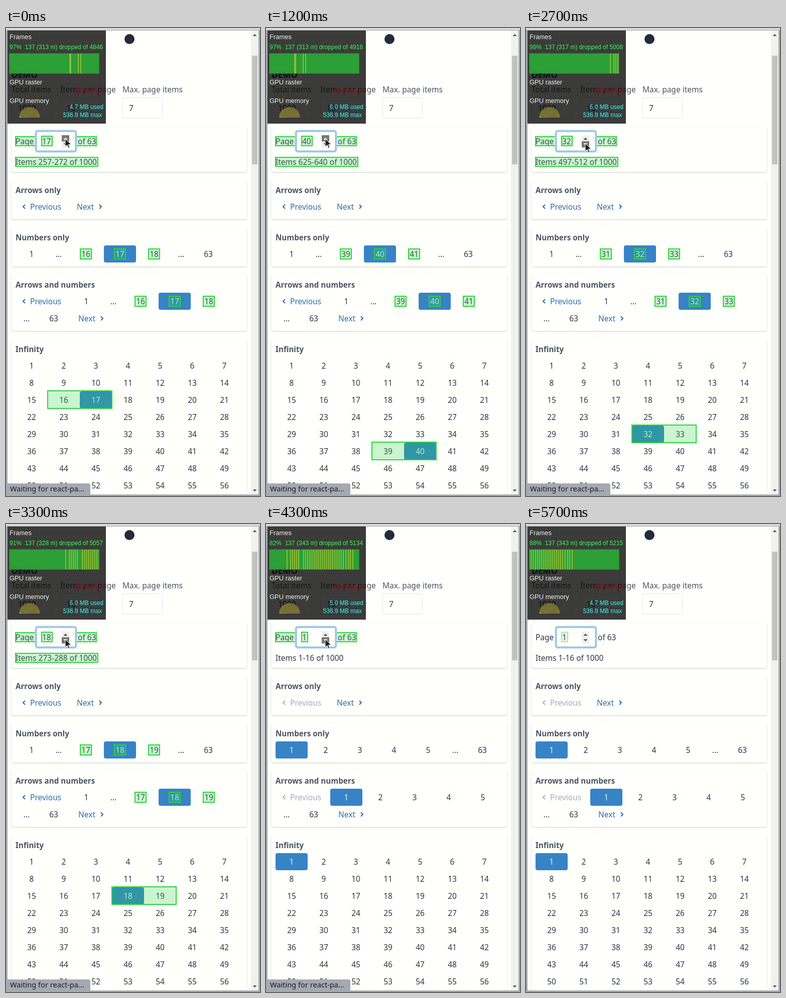
An HTML page with a canvas for the animation above (5800 ms loop, 506 by 930 pixels).

```html
<!DOCTYPE html>
<html lang="en">
<head>
<meta charset="utf-8">
<title>Pagination demo</title>
<style>
html, body { margin: 0; width: 100%; height: 100%; overflow: hidden; background: #fffffb; }
canvas { display: block; }
</style>
</head>
<body>
<canvas id="stage" width="506" height="930"></canvas>
<script>
const ctx = document.getElementById('stage').getContext('2d');
const LOOP = 5800, STEP = 100, LAST = 63;
const PAPER = '#fffffb', INK = '#2d3748', LABEL = '#4a5568', LINK = '#2f6cac';
const SANS = '"Noto Sans", sans-serif';
const BODY = '15.5px ' + SANS, BOLD = 'bold 15.2px ' + SANS;
const METER = '12px "Liberation Sans", sans-serif';

const pageKeys = [[0, 17], [1200, 40], [1400, 44], [1800, 44], [1900, 43],
  [2200, 43], [2700, 32], [3800, 8], [4120, 1]];
const frameKeys = [[0, 4846], [1200, 4916], [1900, 4961], [2700, 5008],
  [3800, 5098], [4300, 5134], [5700, 5215], [5800, 5221]];
const rateKeys = [[0, 97], [1900, 97], [2700, 98], [3800, 86], [4300, 82], [5700, 88]];
const memoryKeys = [[0, 4.7], [300, 6], [1700, 4.7], [2400, 6], [3500, 5.8], [4300, 5], [4600, 4.7]];

// Frame numbers at which a drop enters the chart's right edge
const oldDrops = [4973, 4975, 4990, 4995];
const newDrops = [5176, 5183, 5187, 5191, 5195, 5199,
  ...Array.from({ length: 19 }, (_, i) => 5209 + 4.15 * i),
  5288, 5293, 5298, 5302, 5307];

function lerpKeys(keys, t) {
  const i = keys.findIndex(k => k[0] > t);
  if (i < 0) return keys[keys.length - 1][1];
  const [t0, a] = keys[i - 1], [t1, b] = keys[i];
  return a + (b - a) * (t - t0) / (t1 - t0);
}

const holdKeys = (keys, t) => keys.filter(k => k[0] <= t).pop()[1];

function rect(x, y, w, h, color) {
  ctx.fillStyle = color;
  ctx.fillRect(x, y, w, h);
}

function rounded(x, y, w, h, r, fill, stroke, line = 1) {
  ctx.beginPath();
  ctx.roundRect(x, y, w, h, r);
  if (fill) { ctx.fillStyle = fill; ctx.fill(); }
  if (stroke) { ctx.strokeStyle = stroke; ctx.lineWidth = line; ctx.stroke(); }
}

function text(str, x, y, color = INK, font = BODY, align = 'left') {
  ctx.font = font;
  ctx.textAlign = align;
  ctx.fillStyle = color;
  ctx.fillText(str, x, y);
}

function poly(points, fill, stroke) {
  ctx.beginPath();
  points.forEach(([x, y]) => ctx.lineTo(x, y));
  ctx.closePath();
  ctx.fillStyle = fill;
  ctx.fill();
  if (stroke) { ctx.strokeStyle = stroke; ctx.lineWidth = 1; ctx.stroke(); }
}

function triangle(x, y, dir, color, s = 4) {
  poly([[x - s, y + dir * s / 2], [x + s, y + dir * s / 2], [x, y - dir * s / 2]], color);
}

function flash(x, y, w, h, alpha = 1) {
  ctx.globalAlpha = alpha;
  rect(x, y, w, h, 'rgba(30,210,60,.23)');
  ctx.strokeStyle = '#2bd63a';
  ctx.lineWidth = 2;
  ctx.strokeRect(x + 1, y + 1, w - 2, h - 2);
  ctx.globalAlpha = 1;
}

function card(y, h, title) {
  ctx.save();
  ctx.shadowColor = 'rgba(0,0,0,.2)';
  ctx.shadowBlur = 3;
  ctx.shadowOffsetY = 1;
  rounded(11, y, 469, h, 4, PAPER);
  ctx.restore();
  if (title) text(title, 19, y + 26, LABEL, BOLD);
}

function chevron(x, y, dir, color) {
  ctx.beginPath();
  ctx.moveTo(x - dir * 2, y - 4);
  ctx.lineTo(x + dir * 2, y);
  ctx.lineTo(x - dir * 2, y + 4);
  ctx.strokeStyle = color;
  ctx.lineWidth = 2;
  ctx.stroke();
}

function previous(y, page) {
  const color = page > 1 ? LINK : '#a0aec0';
  chevron(36, y, -1, color);
  text('Previous', 48, y + 5.5, color);
}

function next(x, y) {
  text('Next', x, y + 5.5, LINK);
  chevron(x + 47, y, 1, LINK);
}

function field(x, label, value) {
  text(label, x, 127.5, LABEL);
  rounded(x + .5, 138.5, 79, 41, 4, PAPER, '#e2e8f0');
  text(value, x + 13, 164.5);
}

function cell(n, x, y, selected) {
  if (selected) rounded(x - 32, y - 17, 64, 34, 4, '#3783c6');
  text(n, x, y + 5.5, selected ? '#e6f2f8' : INK, BODY, 'center');
}

function numbers(page, left, y, lit) {
  const early = page <= 4;
  const items = early ? [1, 2, 3, 4, 5, '...', LAST] : [1, '...', page - 1, page, page + 1, '...', LAST];
  const centers = early ? [51, 119, 187, 255, 323, 377, 431] : [51, 105, 159, 227, 295, 349, 403];
  items.forEach((n, i) => {
    const wraps = left && i > 4;
    const x = wraps ? (i === 5 ? 41 : 95) : centers[i] + left;
    const cy = wraps ? y + 34 : y;
    cell(n, x, cy, n === page);
    if (lit && Math.abs(n - page) < 2) {
      const w = n > 9 ? 24 : 15;
      flash(x - w / 2, cy - 11, w, 22);
    }
  });
}

function grid(page, lit, up) {
  const at = n => [51 + (n - 1) % 7 * 64, 671 + Math.floor((n - 1) / 7) * 34];
  for (let n = 1; n <= 56; n++) cell(n, ...at(n), n === page);
  if (!lit) return;
  const first = up ? page - 1 : page;
  const [x, y] = at(first);
  if (first % 7) {
    flash(x - 33, y - 19, 130, 37);
  } else {
    flash(x - 33, y - 19, 66, 37);
    flash(18, y + 15, 66, 37);
  }
}

function pageInput(t, page, showTop) {
  text('Page', 19, 230.5);
  text('of ' + LAST, 143, 230.5);
  const from = (page - 1) * 16 + 1;
  const items = `Items ${from}-${from + 15} of 1000`;
  text(items, 19, 271.5);
  if (showTop) {
    flash(18, 215, 42, 20);
    flash(137, 215, 44, 20);
  }
  if (t < 1700 || t >= 1900 && t < 4300) flash(18, 256, ctx.measureText(items).width + 4, 20);

  rounded(59.5, 204.5, 80, 41, 4, PAPER, '#a6cdec', 4);
  rounded(60.5, 205.5, 78, 39, 3, null, '#80b4dc');
  text(page, 72, 230.5);
  const blink = (t + 150) % 1000;
  if (blink < 450) rect(page > 9 ? 91 : 82, 216, 1, 18, INK);
  const age = blink < 450 ? blink : blink - 450;
  const w = page > 9 ? 23 : 14;
  flash(70, 214, w, 21, showTop || age < 300 ? 1 : .4);

  const hover = t < 1600 ? -1 : t < 5100 ? 1 : 0;
  rect(111, 213, 15, 25, '#efefec');
  if (hover) rect(111, hover < 0 ? 213 : 225, 15, 12.5, '#777774');
  triangle(118.5, 220, 1, hover < 0 ? '#fff' : '#484848');
  triangle(118.5, 231, -1, hover > 0 ? '#fff' : '#484848');
}

function cursor(x, y) {
  poly([[0, 0], [0, 16], [4, 12.5], [6.5, 18.5], [9, 17.5], [6.5, 11.5], [12, 11.5]]
    .map(([dx, dy]) => [x + dx, y + dy]), '#1c1c1c', '#fff');
}

function meter(t) {
  const count = Math.round(lerpKeys(frameKeys, t));
  const dropped = 313 + newDrops.filter(d => d <= count + 186).length;
  const rate = Math.round(lerpKeys(rateKeys, t));
  const head = '13px "Liberation Sans", sans-serif';
  rect(3, 5, 196, 185, 'rgba(0,0,0,.77)');
  text('Frames', 7, 22, '#f2f2f2', head);
  text(`${rate}%  137 (${dropped} m) dropped of ${count}`, 7, 42, '#35fb52', METER);

  rect(6, 50, 180, 41, 'rgba(43,174,54,.88)');
  ctx.save();
  ctx.beginPath();
  ctx.rect(6, 50, 180, 41);
  ctx.clip();
  for (const d of [...oldDrops, ...newDrops]) rect(d - count - 1, 50, 2, 41, '#8fbb35');
  ctx.restore();
  ctx.strokeStyle = '#23802b';
  ctx.lineWidth = 1;
  ctx.strokeRect(6.5, 50.5, 179, 40);

  text('GPU raster', 7, 112, '#f2f2f2', head);
  text('off (device)', 136, 128, '#b00518', METER);
  text('GPU memory', 7, 149, '#f2f2f2', head);
  ctx.beginPath();
  ctx.arc(47, 178, 21, Math.PI, 0);
  ctx.fillStyle = 'rgba(128,122,49,.85)';
  ctx.fill();
  poly([[26, 178], [26, 176.5], [47, 178]], '#2fc53d');
  text(holdKeys(memoryKeys, t).toFixed(1) + ' MB used', 194, 161, '#40f5f5', METER, 'right');
  text('536.9 MB max', 191, 177, '#40f5f5', METER, 'right');
}

function chrome() {
  rect(488, 5, 15, 922, '#f1f1ee');
  rect(490, 55, 11, 216, '#c1c1be');
  triangle(495.5, 14, 1, '#505050');
  triangle(495.5, 919, -1, '#505050');
  rect(0, 0, 506, 4, '#d9d9d9');
  rect(0, 4, 506, 1, '#a4a5ab');
  rect(0, 4, 3, 926, '#a6a8b2');
  rect(503, 4, 3, 926, '#a6a8b2');
  rect(0, 927, 506, 3, '#a6a8b2');
}

function status() {
  rounded(0, 905, 168, 25, [0, 4, 0, 0], '#a6a8b2');
  text('Waiting for react-pa…', 8, 921, '#1c1c20', '14.6px ' + SANS);
}

function draw(t) {
  const page = Math.floor(lerpKeys(pageKeys, t));
  const lit = t < 1700 || t >= 1900 && t < 4300;
  const showTop = t < 1700 || t >= 1900 && t < 4500;
  rect(0, 0, 506, 930, PAPER);

  ctx.beginPath();
  ctx.arc(246, 22, 10, 0, 2 * Math.PI);
  ctx.fillStyle = '#252b3b';
  ctx.fill();
  text('DEMO', 11, 99, INK, 'bold 17.2px ' + SANS);
  field(11, 'Total items', '1000');
  field(108, 'Items per page', '16');
  field(232, 'Max. page items', '7');

  card(196, 90);
  pageInput(t, page, showTop);
  card(302, 78, 'Arrows only');
  previous(355, page);
  next(141, 355);
  card(396, 78, 'Numbers only');
  numbers(page, 0, 449, lit);
  card(490, 112, 'Arrows and numbers');
  previous(543, page);
  numbers(page, 109, 543, lit);
  next(144, 577);
  card(618, 330, 'Infinity');
  grid(page, lit, t < 1800);

  meter(t);
  chrome();
  if (t < 1700 || t >= 2300 && t < 4600) status();
  if (t < 5100) cursor(118, t < 1600 ? 220 : 229);
}

function tick() {
  const t = performance.now() % LOOP;
  draw(Math.floor(t / STEP) * STEP);
  requestAnimationFrame(tick);
}
tick();
</script>
</body>
</html>
```
